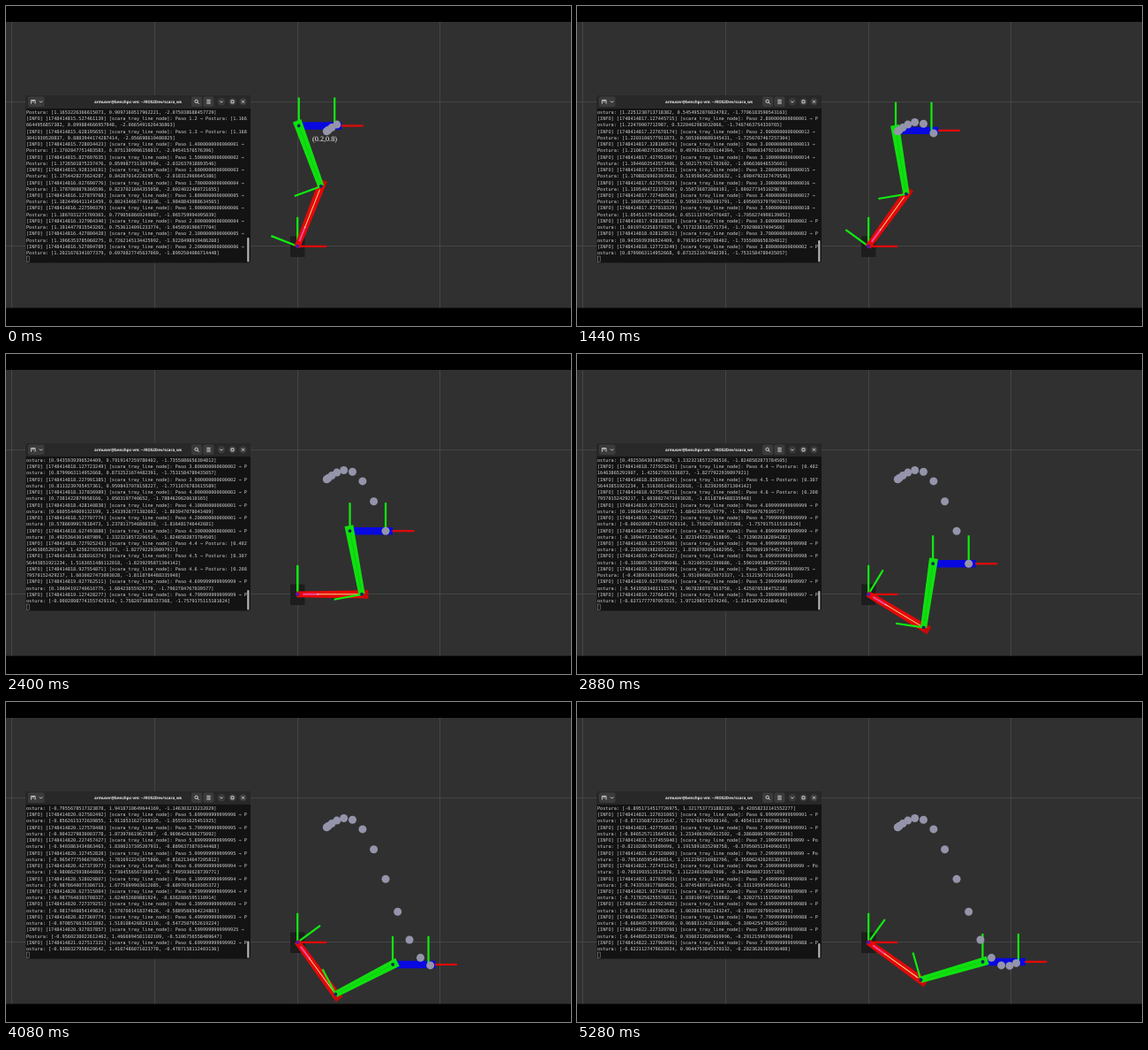
Write an HTML page that moves like this. It is 640 px wide and 362 px high and loops after 5400 ms.

```html
<!DOCTYPE html>
<html lang="es">
<head>
<meta charset="utf-8">
<title>SCARA</title>
<style>
  html, body { margin: 0; width: 100%; height: 100%; overflow: hidden; background: #000; }
  svg { display: block; }
  text { text-rendering: geometricPrecision; white-space: pre; }
  #log { font: 5.19px "DejaVu Sans Mono", monospace; fill: #d0d0d0; }
  #title { font: bold 4.5px "Noto Sans", sans-serif; fill: #f0f0f0; text-anchor: middle; }
  #label { font: 8.2px "Liberation Serif", serif; fill: #fff; text-anchor: middle; }
  .x { stroke: #e60808; stroke-width: 2.2; }
  .y { stroke: #10ee10; stroke-width: 2.2; }
  .icon { fill: none; stroke: #e4e4e4; stroke-width: .9; }
</style>
</head>
<body>
<svg width="640" height="362" viewBox="0 0 640 362">
  <rect width="640" height="362" fill="#000"/>
  <rect y="18" width="640" height="323.5" fill="#303030"/>
  <path d="M6.5 18V341.5M168.5 18V341.5M330.5 18V341.5M491.5 18V341.5M0 108.5H640M0 271.5H640"
        stroke="#484848" stroke-width=".9"/>

  <rect x="322" y="260.5" width="16.5" height="23.5" fill="#1d1d1d"/>
  <g id="arm">
    <path class="x" d="M0 0H33"/>
    <path class="y" d="M0 0V-33"/>
    <g id="j1">
      <path class="y" d="M0 0V-32"/>
      <path d="M-1 -3.4L80 -4.6V4.6L-1 3.4Z" fill="#e60707"/>
      <path d="M75 -4.6H80V4.6H75Z" fill="#c80808"/>
      <path d="M6 0H24" stroke="#f0489a" stroke-width="2"/>
      <path d="M22 0H69" stroke="#f2d890" stroke-width="1"/>
      <circle r="2.2" fill="#5a18a0"/>
      <g id="j2">
        <path class="y" d="M0 0V-32"/>
        <g id="j3">
          <rect y="-4.2" width="48.5" height="8.4" fill="#0808e0"/>
          <path class="x" d="M48 0H73"/>
          <path class="y" d="M0 0V-32M40.5 0V-32"/>
        </g>
        <path d="M0 -3.6L79 -5V5L0 3.6Z" fill="#10e010"/>
        <path d="M6 0H70" stroke="#0ccc0c" stroke-width="1"/>
        <circle r="2" fill="#102a60"/>
        <circle cx="73" r="1.9" fill="#0a2a50"/>
      </g>
    </g>
  </g>
  <g id="trail" fill="#9494aa"></g>
  <text id="label" x="361" y="152.8">(0.2,0.8)</text>

  <rect x="22.5" y="101" width="254.5" height="189.5" rx="3" fill="#131313"/>
  <path d="M22.5 116V104a3 3 0 0 1 3-3H274a3 3 0 0 1 3 3V116Z" fill="#282828"/>
  <g fill="#3b3b3b">
    <rect x="25" y="102.5" width="18.5" height="11.5" rx="2"/>
    <rect x="210" y="102.5" width="12" height="11.5" rx="2"/>
    <rect x="223.5" y="102.5" width="12" height="11.5" rx="2"/>
    <circle cx="244" cy="108.3" r="4.2"/>
    <circle cx="256.5" cy="108.3" r="4.2"/>
    <circle cx="268.5" cy="108.3" r="4.2"/>
  </g>
  <g class="icon">
    <path d="M28.5 110.5V106.5H33V110.5M30.7 106.5V109M38 107.5l1.6 1.6l1.6 -1.6"/>
    <circle cx="215.6" cy="107.8" r="1.7"/>
    <path d="M216.8 109l1.8 1.8M227.3 106.4h4.4M227.3 108.3h4.4M227.3 110.2h4.4"/>
    <path d="M242.4 107.6l1.6 1.6l1.6 -1.6M255 106.8h3v3h-3ZM267 106.8l3 3m0 -3l-3 3"/>
  </g>
  <text id="title" x="149.5" y="109.9">armuser@benchpc-vm: ~/ROS2Dev/scara_ws</text>
  <g id="log"></g>
  <rect x="23.6" y="283" width="2.6" height="6.2" fill="none" stroke="#a0a0a0" stroke-width=".5"/>
  <rect id="bar" x="273.2" width="2.2" rx="1" fill="#b4b4b4"/>
</svg>
<script>
const $ = id => document.getElementById(id);
const NS = 'http://www.w3.org/2000/svg';
const FRAME = 120, FRAMES = 45, ROWS = 23, COLS = 80;
const BASE = { x: 330.2, y: 271.8 }, SCALE = 162;   // pixels, pixels per metre
const LINK = 0.45, REACH = 0.25;                    // metres

const noise = n => { const s = Math.sin(n * 12.9898) * 43758.5453; return s - Math.floor(s); };

// The step clock accumulates 0.1, rounding errors included
const clock = [0];
for (let k = 1; k <= 90; k++) clock.push(clock[k - 1] + 0.1);

// Tool path: a sine along a diagonal, with quintic easing over 10 s
function target(k) {
  const s = clock[k] / 10;
  const p = 10 * s ** 3 - 15 * s ** 4 + 6 * s ** 5;
  return [0.2 + 0.9 * p, 0.8 - 0.9 * p + 0.25 * Math.sin(2 * Math.PI * p)];
}

// Inverse kinematics with the tool held level
function pose(k) {
  const [tx, y] = target(k), x = tx - REACH;
  const c = (x * x + y * y) / (2 * LINK * LINK) - 1;
  const b = Math.acos(c);
  const a = Math.atan2(y, x) - Math.atan2(Math.sin(b), 1 + c);
  return [a, b, -(a + b)];
}

function entry(k) {
  const stamp = '17484148' + (14.3273 + k / 10 + noise(k) * 9e-4).toFixed(9);
  const s = `[INFO] [${stamp}] [scara_tray_line_node]: Paso ${clock[k]} → ` +
    `Postura: [${pose(k).join(', ')}]`;
  return [s.slice(0, COLS), s.slice(COLS)];
}

function add(parent, tag, attrs) {
  const el = document.createElementNS(NS, tag);
  for (const key in attrs) el.setAttribute(key, attrs[key]);
  return parent.appendChild(el);
}

const rows = Array.from({ length: ROWS }, (_, i) =>
  add($('log'), 'text', { x: 23, y: 122 + i * 7.23 }));

// One marker every half second
const dots = [];
for (let k = 8; k < 80; k += 5) {
  const [x, y] = target(k);
  const el = add($('trail'), 'circle', { cx: BASE.x + x * SCALE, cy: BASE.y - y * SCALE, r: 4.5 });
  dots.push({ k, el });
}

function turn(id, x, rad) {
  $(id).setAttribute('transform', `translate(${x} 0) rotate(${rad * 180 / Math.PI})`);
}

const show = (el, on) => el.setAttribute('visibility', on ? 'visible' : 'hidden');

function draw(f) {
  const u = 22.4 + f * 58 / 44;
  const now = Math.floor(u);

  // The arm trails the log slightly in the first part
  const [a, b, c] = pose(Math.floor(u - (f < 30 ? .5 : .1)));
  turn('j1', 0, -a);
  turn('j2', LINK * SCALE, -b);
  turn('j3', LINK * SCALE, -c);

  dots.forEach(({ k, el }) => show(el, now >= k - 1));
  show($('label'), f < 4);

  const lines = [];
  for (let k = now - 11; k <= now; k++) lines.push(...entry(k));
  rows.forEach((row, i) => row.textContent = lines[i + 1]);

  const top = 262 + f / 4;
  $('bar').setAttribute('y', top);
  $('bar').setAttribute('height', 289.5 - top);
}

$('arm').setAttribute('transform', `translate(${BASE.x} ${BASE.y})`);
const start = performance.now();
let shown = -1;
function tick() {
  const f = Math.floor((performance.now() - start) / FRAME) % FRAMES;
  if (f !== shown) draw(shown = f);
  requestAnimationFrame(tick);
}
tick();
</script>
</body>
</html>
```
